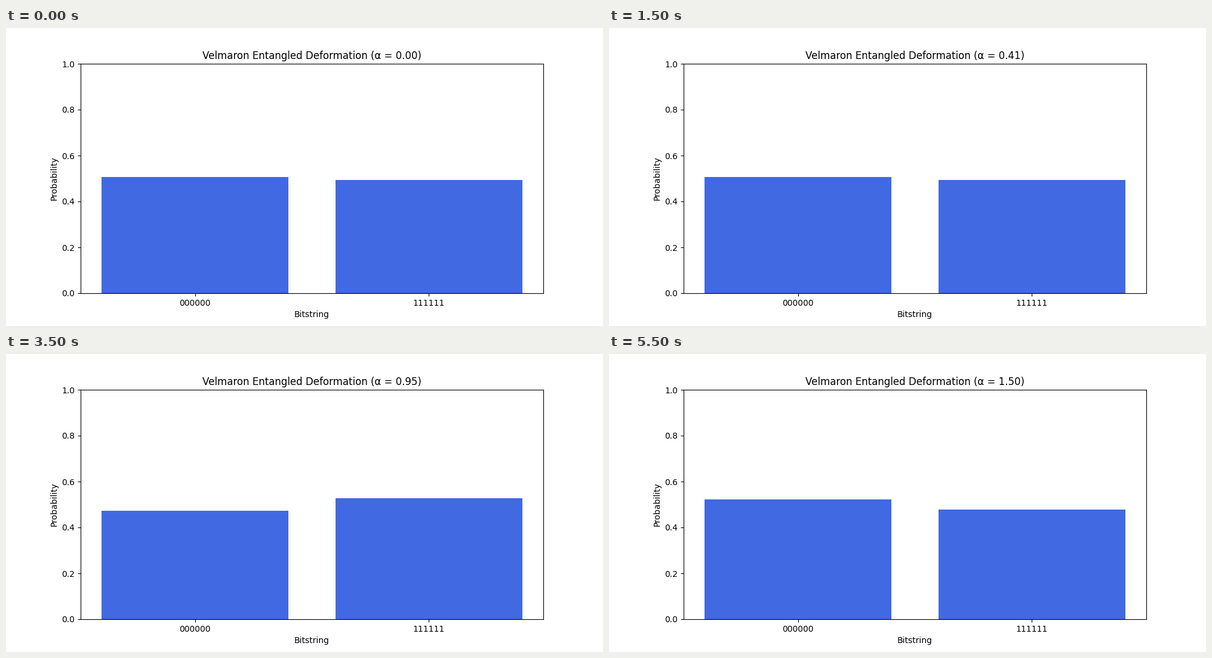
Animation of 1000x500 px, one loop 6 s. Source, as a matplotlib script:

```python
import matplotlib.pyplot as plt
import numpy as np
from matplotlib.animation import FuncAnimation

STATES = ["000000", "111111"]
# Measured share of the first state at each deformation step
P_ZERO = [0.507, 0.491, 0.468, 0.507, 0.509, 0.491,
          0.532, 0.473, 0.525, 0.478, 0.501, 0.522]
ALPHAS = np.linspace(0, 1.5, len(P_ZERO))
LOOP_MS = 6000

plt.rcParams["font.family"] = "DejaVu Sans"
fig, ax = plt.subplots(figsize=(10, 5), dpi=100)
bars = ax.bar(STATES, [0.5, 0.5], color="royalblue")
ax.set_ylim(0, 1)
ax.set_xlabel("Bitstring")
ax.set_ylabel("Probability")
title = ax.set_title("")


def update(i):
    p = P_ZERO[i]
    for bar, height in zip(bars, (p, 1 - p)):
        bar.set_height(height)
    title.set_text(f"Velmaron Entangled Deformation (α = {ALPHAS[i]:.2f})")
    return [*bars, title]


anim = FuncAnimation(fig, update, frames=len(P_ZERO),
                     interval=LOOP_MS // len(P_ZERO), repeat=True,
                     repeat_delay=0, blit=False)
plt.show()
```
